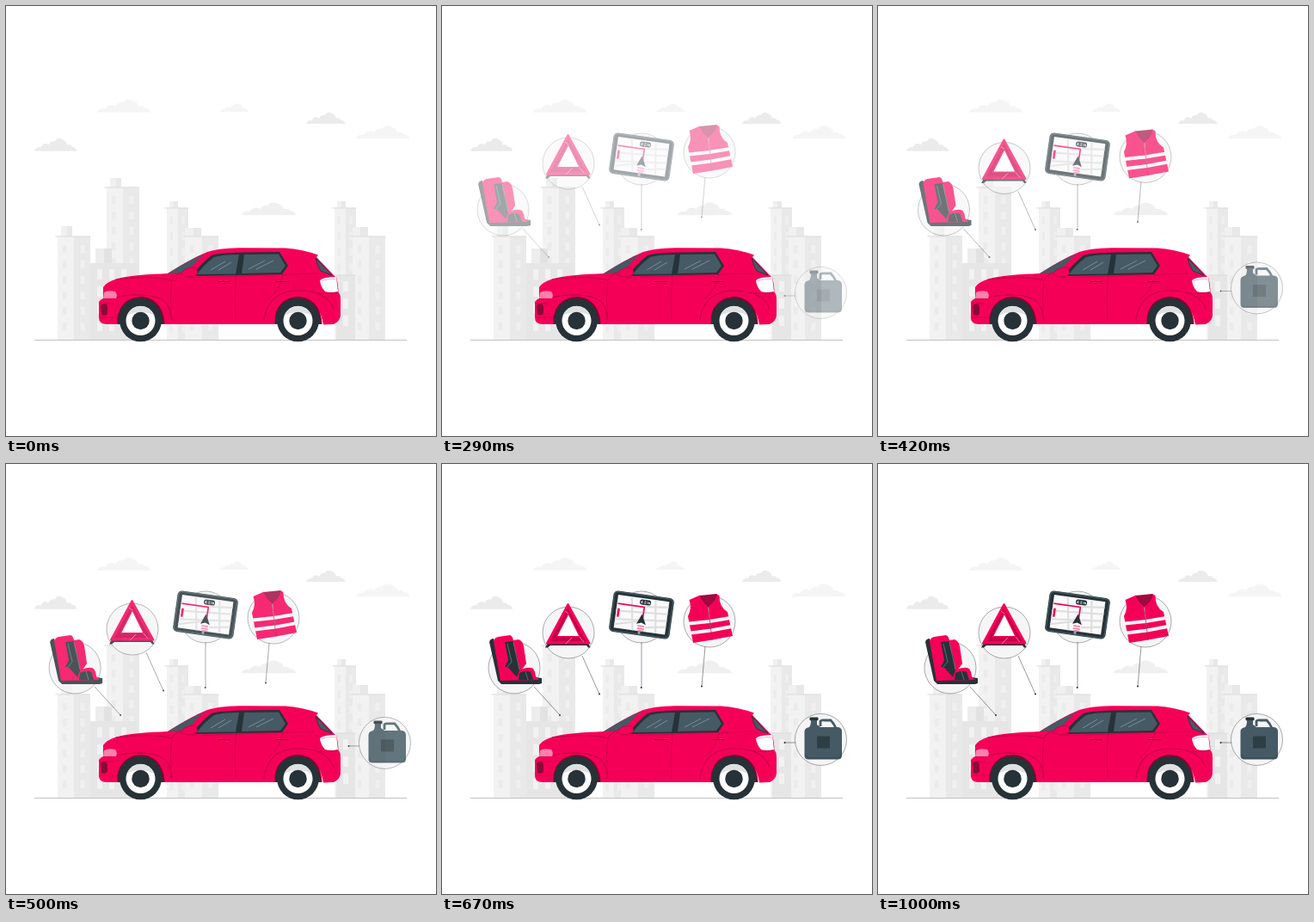
Write an HTML page that moves like this. It is 500x500 px and loops after 1040 ms.

```html
<!DOCTYPE html>
<html lang="en">
<head>
<meta charset="utf-8">
<title>Car accessories</title>
<style>
html, body { margin: 0; width: 100%; height: 100%; overflow: hidden; background: #fff; }
svg { display: block; width: 100vw; height: 100vh; }
.ring { fill: #f5f5f5; stroke: #263238; stroke-width: .4; }
.lead { stroke: #263238; stroke-width: .5; }
.dot { fill: #263238; }
.red { fill: #f50057; }
.dark { fill: #263238; }
.slate { fill: #455a64; }
.seam { fill: none; stroke: #7d0830; stroke-width: .6; }
text { font: 700 4.2px Inter, Arial, sans-serif; fill: #fff; text-anchor: middle; }
</style>
</head>
<body>
<svg viewBox="0 0 500 500">
  <defs>
    <path id="cloud" d="M0 15C1 11 6 10 9 11C12 6 17 5 21 8C23 4 27 3 30 4C32 0 38-1 42 2C46 3 47 5 48 8C52 7 55 8 55 10C59 10 62 12 62 15Z"/>
    <g id="wheel">
      <path d="M-27 4V-2C-26 -20 -12 -28 0 -28C14 -28 27 -18 28 4Z" fill="#7d0830"/>
      <path d="M-26 4V-2C-25 -18 -12 -26 0 -26C13 -26 25 -17 26 4Z" class="dark"/>
      <circle r="24.3" class="dark"/>
      <circle r="17" fill="#fff"/>
      <path d="M-16 -6A17 17 0 0 1 16 -6Q0 -14 -16 -6Z" fill="#e0e0e0"/>
      <circle r="10.2" class="dark"/>
    </g>
  </defs>

  <g id="sky"></g>
  <g id="city"></g>
  <path d="M33 388.5H466" stroke="#a6a6a6" stroke-width=".7"/>

  <g id="car">
    <path class="red" d="M188 311C204 301 219 292 234 286C246 282 261 281.300 277 281.200L325 281.500Q345 283 363 289.500L361 292L381 313Q386 316 386.500 333Q389 335 389 341V360Q388 367 381 370L369 370.500C366 350 355 342.500 340 342.500C323 342.500 315 353 313 370H184C183 352 171 342.500 157 342.500C141 342.500 132 353 131.500 370H117Q108 370 108 362V344Q110 341 113 340V327Q117 321 128 317.500C143 313 166 312 188 311Z"/>
    <path class="seam" stroke-dasharray="3 .6" d="M113 340H126Q135 336 157 336Q184 337 189 350Q192 357 192 365M300 365Q305 331 340 331Q374 331 381 353M385 333Q371 335 363 334M128 318Q171 313 193 319Q197 312 207 308"/>
    <path class="seam" stroke-width=".5" opacity=".5" d="M193 319Q190 337 193 366M268 313Q265 337 267 365M322 312Q318 331 305 341M214 316L362 311"/>
    <path class="slate" d="M188 311C203 302 218 293 233 288Q223 294 217 302Q211 307 203 310Z"/>
    <path class="dark" d="M216 314Q227 299 239 290Q248 287 274 286.500L318 286L328 302L321 312Z"/>
    <path class="slate" d="M222 312Q230 301 242 292Q252 289 271 289L267 311.500ZM277 289L317 288.500L325 302L319 310L274 311Z"/>
    <path d="M238 307L255 297M247 307L262 298M282 306L301 296M291 306L311 296" stroke="#90a4ae" stroke-width=".7"/>
    <path class="slate" stroke="#263238" stroke-width=".8" d="M360 293L379 313L366 308Q362 302 360 293Z"/>
    <path d="M365 319Q369 315 384 315L386 332Q377 334 371 332Q366 327 365 319Z" fill="#fff"/>
    <path d="M384 315L385 318Q373 317 366 320" fill="none" stroke="#ff80ab" stroke-width=".6"/>
    <path d="M203 312Q208 304 217 304Q222 304 223 311Q219 315 211 315Z" class="red" stroke="#a00a40" stroke-width=".6"/>
    <path d="M114 333Q119 330 127 332Q130 336 128 340L113 340Z" fill="#ff80ab"/>
    <path d="M110 348Q117 343 118 350V357Q117 361 111 359Z" fill="#8a0a37"/>
    <path d="M109 346H125M110 362H130" class="seam" opacity=".6"/>
    <path d="M247 320.500H261M314 320.500H328" stroke="#5b1230" stroke-width="1.200" stroke-linecap="round"/>
    <use href="#wheel" x="156.500" y="366"/>
    <use href="#wheel" x="339.500" y="366"/>
  </g>

  <g class="item" data-dx="1">
    <circle class="ring" cx="84" cy="237" r="30"/>
    <path class="lead" d="M107 259L137 292"/><circle class="dot" cx="137" cy="292" r="1"/>
    <path class="dark" d="M55 207Q56 203 60 203L72 248H109L116 249V255L113 256H69L65 252Z"/>
    <path class="red" d="M60 206Q61 202 65 201L79 199Q82 200 83 205L89 204Q94 206 95 212L98 232L91 242L92 249L68 252Z"/>
    <path class="dark" d="M73 207L83 206Q83 214 87 222L90 240L87 248L73 236L77 228Z"/>
    <path d="M76 209L81 230L75 237M83 207L90 239" fill="none" stroke="#607d8b" stroke-width=".8"/>
    <path class="red" d="M70 237Q76 234 80 240L88 249L92 239Q101 235 106 238Q109 242 109 247L113 251L68 252Z"/>
    <path class="dark" d="M90 243Q98 239 103 242L106 251H89Z"/>
    <path d="M97 241L100 251" stroke="#607d8b" stroke-width=".8"/>
  </g>

  <g class="item" data-dy="1">
    <circle class="ring" cx="147" cy="196" r="30"/>
    <path class="lead" d="M163 223L183 267.500"/><circle class="dot" cx="183" cy="267.500" r="1"/>
    <path class="dark" d="M120 213.500L123 208H170L172.500 213.500H170L168 211H126L123 213.500Z"/>
    <path class="red" stroke="#f50057" stroke-width="2" stroke-linejoin="round" d="M146.500 163L122 208.500H171.500Z"/>
    <path d="M146.500 168L126 206H167.500Z" fill="#c4004a"/>
    <path d="M147 174L160 200.500H133.500Z" fill="#fff" stroke="#f50057" stroke-width="1.200"/>
    <path d="M143 171L147 174M160 201L165 207M144 209L151 202" stroke="#ff80ab" stroke-width=".9"/>
  </g>

  <g class="item">
    <circle class="ring" cx="232" cy="178" r="30"/>
    <path class="lead" d="M232 207V260"/><circle class="dot" cx="231.700" cy="260" r="1"/>
    <g transform="translate(232 175.500) rotate(8)">
      <rect class="dark" x="-35.500" y="-24" width="71" height="48" rx="5"/>
      <rect x="-34.300" y="-22.800" width="68.600" height="45.600" rx="4" fill="none" stroke="#455a64" stroke-width="1.200"/>
      <rect x="-30" y="-19.500" width="60" height="38.500" fill="#fafafa"/>
      <path d="M-30 -1L30 -5M-30 9L30 3M-14 -19L-8 19M14 -19L19 19M4 -10L30 -13M-30 15L-3 8M6 14L30 10" stroke="#dedede" stroke-width="2.200"/>
      <path d="M-29 -9.500H2V4" fill="none" stroke="#f50057" stroke-width="1.700"/>
      <rect class="red" x="-28.500" y="-4" width="2.600" height="10"/>
      <rect class="dark" x="-4" y="-18" width="13" height="6" rx="2.500"/>
      <text x="2.500" y="-13.500">4.2 m</text>
      <path class="dark" d="M.5 -1L6.500 11L1 9L-4.500 11Z"/>
      <path d="M-3 13H5M-3 16H5M-2 18.500H5" stroke="#ff80ab" stroke-width="1.700"/>
      <circle cx="0" cy="21" r="1.600" fill="#90a4ae"/>
    </g>
  </g>

  <g class="item" data-dy="1">
    <circle class="ring" cx="311" cy="183" r="30"/>
    <path class="lead" d="M306 212L302 258.500"/><circle class="dot" cx="302" cy="258.500" r="1"/>
    <path d="M299 153L319 151L320 162L306 168Z" fill="#a00a40"/>
    <path class="red" d="M300 152.500L287.500 158Q291 168 286 177L292 208L314 204.500L309 165Q303 161 300 152.500ZM319 151L322.500 153Q322 166 332 172L338 200L314 204.500L310 165Q318 160 319 151Z"/>
    <g fill="none" stroke="#f5f5f5" stroke-width="4">
      <path d="M287 185.500L311 183L335 179M289 196.500L313 193.500L337 189"/>
    </g>
    <path d="M309.500 165L314 204.500M300 153Q303 161 309.500 165Q318 160 319 151" class="seam"/>
  </g>

  <g class="item" data-dy="-1">
    <circle class="ring" cx="440.500" cy="320.500" r="30"/>
    <path class="lead" d="M398 324H411"/><circle class="dot" cx="398.500" cy="324" r="1"/>
    <path d="M440 305V299Q441 297.500 444 298H452Q456 302 458 307" fill="none" stroke="#455a64" stroke-width="2.800"/>
    <rect class="dark" x="427.500" y="294.500" width="10" height="3.800" rx="1"/>
    <path class="slate" d="M429 298H436V303L440 306H461Q465 307 465 311V339Q465 343.500 460 343.500H426Q421.500 343.500 421.500 339V311Q421.500 307 427 306Q429 304 429 298Z"/>
    <path d="M423 338Q423 342 427 342H460Q464 342 464 338" fill="none" stroke="#37474f" stroke-width="1"/>
    <rect x="436" y="316.500" width="15" height="14" fill="#263238" opacity=".7"/>
  </g>
</svg>
<script>
const NS = "http://www.w3.org/2000/svg";
const pick = id => document.getElementById(id);

function add(parent, tag, attrs) {
  const el = document.createElementNS(NS, tag);
  for (const key in attrs) el.setAttribute(key, attrs[key]);
  parent.append(el);
}

function rect(x, y, width, height, fill) {
  add(pick("city"), "rect", { x, y, width, height, fill });
}

// x, y, width, colour
const clouds = [
  [106, 108.5, 62, "#f5f5f5"], [249, 113, 33, "#f5f5f5"],
  [349, 123.5, 45, "#ebebeb"], [407, 139, 62, "#f5f5f5"],
  [33, 153.5, 49, "#ebebeb"], [274, 228, 63, "#f0f0f0"]
];
for (const [x, y, w, fill] of clouds) {
  const h = w < 40 ? 10 : w < 47 ? 13.5 : 15.2;
  add(pick("sky"), "use", {
    href: "#cloud", fill, transform: `translate(${x} ${y}) scale(${w / 62} ${h / 15})`
  });
}

// Two-sided tower with a roof box and two columns of windows
function tower(x, y, w, boxX, boxW, boxH) {
  const half = w / 2;
  rect(boxX, y - boxH, boxW / 2, boxH, "#f0f0f0");
  rect(boxX + boxW / 2, y - boxH, boxW / 2, boxH, "#e8e8e8");
  rect(x, y, half, 388 - y, "#f2f2f2");
  rect(x + half, y, half, 388 - y, "#e9e9e9");
  rect(x - 2.5, y - .7, w + 2.5, 1.2, "#e0e0e0");
  for (let row = y + 10; row < 378; row += 18) {
    rect(x + half * .3, row, half * .25, 9, "#ebebeb");
    rect(x + half * 1.4, row, half * .25, 9, "#f0f0f0");
  }
}

function block(x, y, w, cols, winW) {
  rect(x, y, w, 388 - y, "#e6e6e6");
  for (let row = y + 7; row < 375; row += 20)
    for (let c = 0; c < cols; c++) rect(x + 8 + c * 14, row, winW, 12, "#f2f2f2");
}

tower(117, 211, 38, 121, 13, 11);
tower(60, 268, 38, 64, 13, 12);
rect(104, 282, 10, 17, "#ededed");
rect(114, 282, 9, 17, "#e2e2e2");
block(98, 299, 55, 3, 6);
tower(187, 235, 25, 190, 10, 8);
tower(208, 268, 39, 208, 19, 10);
tower(382, 235, 25, 385, 10, 8);
tower(403, 268, 38, 403, 18, 11);
block(384, 313, 22, 1, 6);
rect(384, 312.5, 23, 1, "#dcdcdc");

const LOOP = 1040, FPS = 24, TRAVEL = 22;
const items = document.querySelectorAll(".item");

function draw(time) {
  const step = Math.floor((time + 3.4) * FPS / 1000);
  const shown = Math.min(1, Math.max(0, (step - 1.8) / 12.2));
  // Linear slide in, then a small overshoot and return
  const sway = step > 14 ? 1.3 * Math.sin(Math.PI * (step - 14) / 12) ** 2 : 0;
  const offset = (1 - shown) * TRAVEL + .3 - sway;
  for (const item of items) {
    const { dx = 0, dy = 0 } = item.dataset;
    item.setAttribute("opacity", shown);
    item.setAttribute("transform", `translate(${-dx * offset} ${-dy * offset})`);
  }
}

const start = performance.now();
function tick() {
  draw((performance.now() - start) % LOOP);
  requestAnimationFrame(tick);
}
tick();
</script>
</body>
</html>
```
